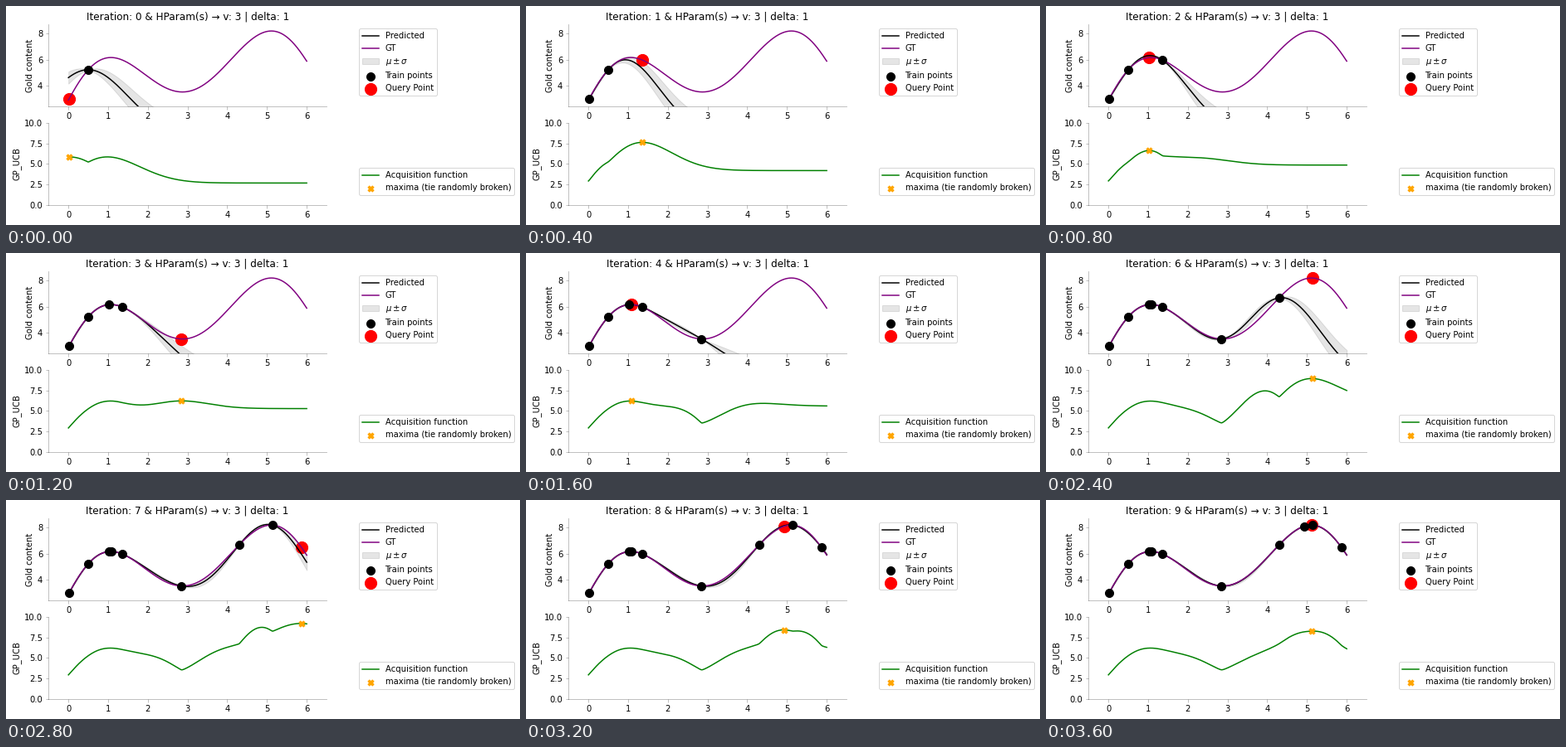
A matplotlib script for the animation above (4 s loop, 619 px wide and 264 px high).

```python
import numpy as np
import matplotlib.pyplot as plt
from matplotlib.animation import FuncAnimation

W, H, DPI = 619, 264, 72
LEFT, BOTTOM, AX_W, AX_H, GAP = 51.26, 24.2, 334.8, 98.84, 19.77
V, DELTA, NOISE = 3, 1, 1e-4
FAINT = (0, 0, 0, 0.3)

START = 0.5
QUERIES = [0.02, 1.36, 1.025, 2.85, 1.075, 4.3, 5.135, 5.87, 4.93, 5.11]


def fit_truth():
    """Degree-6 polynomial with fixed turning points, fitted to a few values."""
    slope = np.poly([1.07, 2.87, 5.11])
    basis = [np.polyint(np.polymul(slope, q)) for q in ([1], [1, 0], [1, 0, 0])]
    basis.append(np.array([1.0]))
    px = np.array([0, 0.5, 1.07, 1.36, 2.87, 4.3, 5.11, 5.87, 6])
    py = np.array([2.86, 5.25, 6.16, 5.97, 3.46, 6.67, 8.2, 6.47, 5.86])
    A = np.stack([np.polyval(b, px) for b in basis], axis=1)
    coef = np.linalg.lstsq(A, py, rcond=None)[0]
    return lambda x: sum(c * np.polyval(b, x) for c, b in zip(coef, basis))


truth = fit_truth()


def kernel(a, b):
    return np.exp(-0.5 * (a[:, None] - b[None, :]) ** 2)


def posterior(train, x):
    K = kernel(train, train) + NOISE * np.eye(len(train))
    k = kernel(train, x)
    sol = np.linalg.solve(K, k)
    mu = sol.T @ truth(train)
    var = 1 - np.sum(k * sol, axis=0)
    return mu, np.sqrt(np.clip(var, 0, None))


def ucb(mu, sigma, t):
    beta = 2 * np.log(t ** 2.5 * np.pi ** 2 / (3 * DELTA))
    return mu + np.sqrt(V * beta) * sigma


def add_axes(y):
    ax = fig.add_axes([LEFT / W, y / H, AX_W / W, AX_H / H])
    ax.spines[["top", "right"]].set_visible(False)
    ax.spines[["left", "bottom"]].set_color(FAINT)
    ax.tick_params(color=FAINT)
    ax.set_xlim(-0.5, 6.5)
    ax.set_xticks(range(7))
    return ax


plt.rcParams.update({"font.family": "DejaVu Sans", "font.size": 10})
fig = plt.figure(figsize=((W + 1e-6) / DPI, (H + 1e-6) / DPI), dpi=DPI,
                 facecolor="white")
top = add_axes(BOTTOM + AX_H + GAP)
low = add_axes(BOTTOM)

xs = np.linspace(0, 6, 601)
gt = truth(xs)

pred, = top.plot(xs, gt, color="black", label="Predicted")
top.plot(xs, gt, color="purple", label="GT")
band = top.fill_between(xs, gt, gt, color="black", alpha=0.1,
                        label=r"$\mu \pm \sigma$")
train_dots = top.scatter([START], [truth(START)], s=100, color="black",
                         zorder=7, label="Train points")
query_dot = top.scatter([0], [0], s=200, color="red", label="Query Point")
top.set_ylim(gt.min() - 0.5, gt.max() + 0.5)
top.set_yticks([4, 6, 8])
top.set_ylabel("Gold content")
title = top.set_title("", fontsize=12, pad=6, y=1.0)
top.legend(loc="upper left", bbox_to_anchor=(1.1, 1.0))

acq, = low.plot(xs, gt, color="green", label="Acquisition function")
best = low.scatter([0], [0], s=50, marker="X", color="orange", zorder=6,
                   label="maxima (tie randomly broken)")
low.set_ylim(0, 10)
low.set_yticks(np.arange(0, 10.1, 2.5))
low.set_ylabel("GP_UCB")
low.legend(loc="upper left", bbox_to_anchor=(1.1, 0.5))


def update(i):
    train = np.array([START] + QUERIES[:i])
    q = QUERIES[i]
    mu, sigma = posterior(train, xs)
    score = ucb(mu, sigma, i + 1)

    pred.set_ydata(mu)
    edge = np.concatenate([mu + sigma, (mu - sigma)[::-1]])
    band.set_verts([np.column_stack([np.concatenate([xs, xs[::-1]]), edge])])
    train_dots.set_offsets(np.column_stack([train, truth(train)]))
    query_dot.set_offsets([[q, truth(q)]])
    acq.set_ydata(score)
    best.set_offsets([[q, np.interp(q, xs, score)]])
    title.set_text(f"Iteration: {i} & HParam(s) → v: {V} | delta: {DELTA}")
    return pred, band, train_dots, query_dot, acq, best, title


anim = FuncAnimation(fig, update, frames=len(QUERIES), interval=400,
                     repeat=True, repeat_delay=0, blit=False)
plt.show()
```
